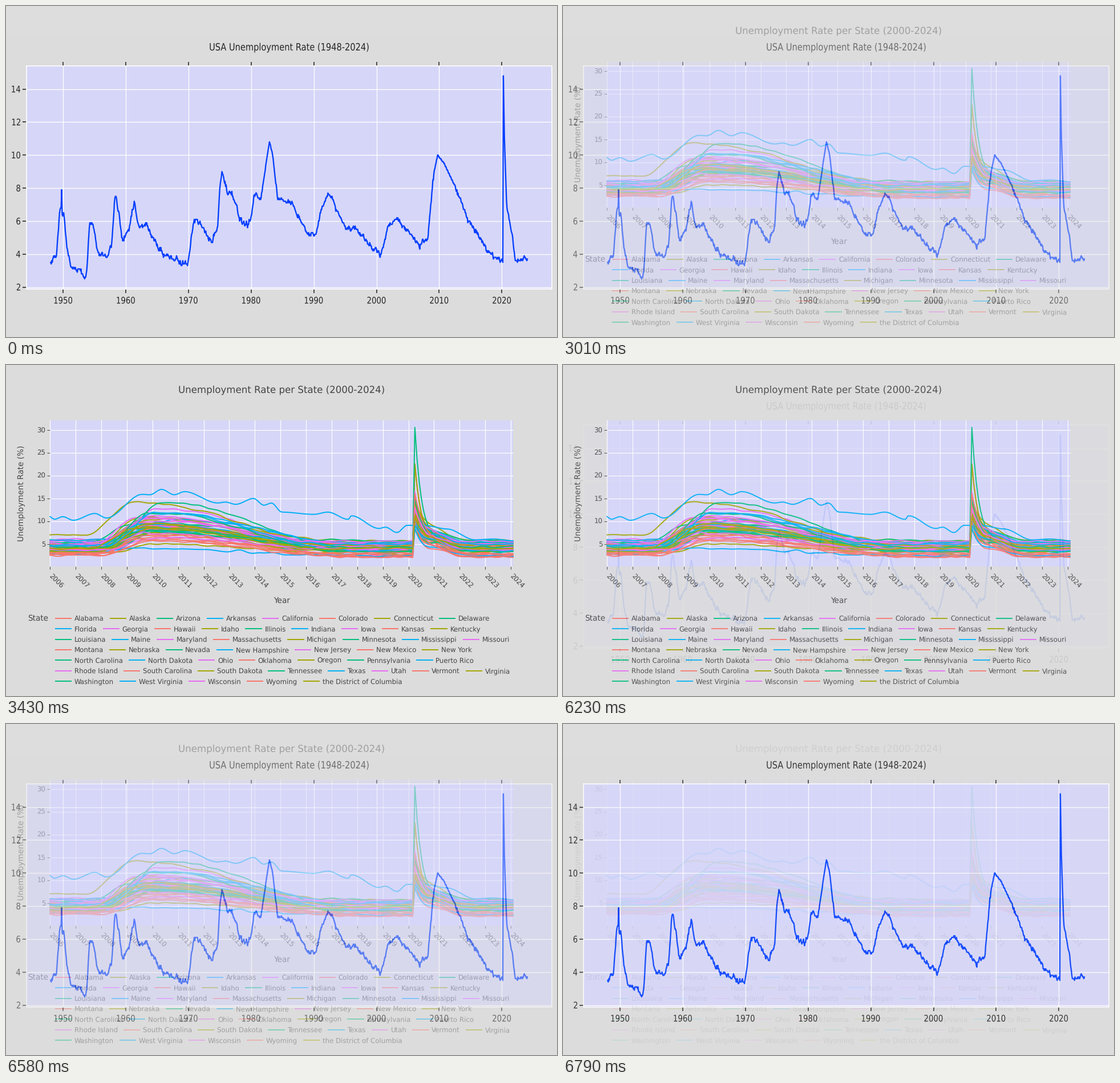
A matplotlib script for the animation above (6860 ms loop, 966 by 580 pixels).

```python
import numpy as np
import matplotlib.pyplot as plt
from matplotlib.animation import FuncAnimation
from matplotlib.patches import PathPatch, Rectangle
from matplotlib.textpath import TextPath
from matplotlib.transforms import Affine2D

W, H, DPI = 966, 580, 100
PT = 72 / DPI
GREY, PANEL, DARK, INK = "#dcdcdc", "#d6d6f8", "#262626", "#444444"
PALETTE = ["#F8766D", "#A3A500", "#00BF7D", "#00B0F6", "#E76BF3"]
TALL = 1.2          # the national chart has taller letters

plt.rcParams.update({"font.family": "DejaVu Sans", "text.hinting": "none"})
fig = plt.figure(figsize=(W / DPI, H / DPI), dpi=DPI, facecolor=GREY)

# Turning points of the national rate: (year, percent)
CYCLE = [
    (1948, 3.5), (1948.9, 3.9), (1949.5, 6.7), (1949.67, 6.7), (1949.75, 7.9),
    (1949.83, 6.5), (1950.1, 6.4), (1950.6, 4.4), (1951.3, 3.1), (1952.6, 3.1),
    (1953.4, 2.5), (1953.75, 3.0), (1954.2, 5.8), (1954.67, 6.0), (1955.5, 4.1),
    (1957.2, 3.9), (1957.7, 4.5), (1958.25, 7.4), (1958.5, 7.5), (1959.4, 5.0),
    (1960.3, 5.2), (1961.35, 7.1), (1962.1, 5.5), (1963.2, 5.8), (1966, 3.9),
    (1968.7, 3.5), (1969.9, 3.5), (1970.9, 6.0), (1971.8, 5.9), (1973.8, 4.7),
    (1974.7, 5.8), (1975, 8.1), (1975.35, 9.0), (1976.3, 7.6), (1976.9, 7.7),
    (1978.3, 6.0), (1979.4, 5.7), (1980.1, 6.3), (1980.5, 7.7), (1981.5, 7.3),
    (1982.92, 10.8), (1983.4, 10.1), (1984.2, 7.4), (1986.5, 7.1), (1989.2, 5.1),
    (1990.4, 5.3), (1991.2, 6.7), (1992.4, 7.7), (1995, 5.6), (1996.3, 5.6),
    (2000.6, 3.9), (2001.9, 5.7), (2003.42, 6.1), (2006.9, 4.5), (2008.2, 5.0),
    (2009.2, 9.0), (2009.75, 10.0), (2010.8, 9.5), (2012.9, 7.8), (2014.5, 6.1),
    (2018, 4.1), (2020.17, 3.5), (2020.25, 14.8), (2020.42, 11.0), (2020.8, 6.8),
    (2021.4, 5.8), (2022.2, 3.6), (2024.1, 3.8),
]

# Crests and troughs of the one curve above the bundle
ISLAND = [
    (2006, 11), (2006.15, 10.4), (2006.5, 11), (2006.9, 10.2), (2007.75, 11.7),
    (2008.2, 10.7), (2009.6, 15.9), (2009.9, 15.8), (2010.35, 17), (2010.85, 15.8),
    (2011.25, 16.5), (2012.55, 14), (2012.85, 14.2), (2013.25, 13.7), (2013.95, 15),
    (2014.35, 13.5), (2014.65, 14), (2015.05, 12), (2016.3, 11.5), (2016.85, 12),
    (2017.65, 10.4), (2017.77, 11.2), (2018.85, 8.4), (2019.1, 8.7), (2019.55, 7.5),
    (2019.95, 9.1), (2020.7, 9), (2021.5, 8.3), (2022.6, 5.9), (2023.3, 6.1), (2024.1, 5.7),
]

LEGEND = """\
Alabama, Alaska, Arizona, Arkansas, California, Colorado, Connecticut, Delaware
Florida, Georgia, Hawaii, Idaho, Illinois, Indiana, Iowa, Kansas, Kentucky
Louisiana, Maine, Maryland, Massachusetts, Michigan, Minnesota, Mississippi, Missouri
Montana, Nebraska, Nevada, New Hampshire, New Jersey, New Mexico, New York
North Carolina, North Dakota, Ohio, Oklahoma, Oregon, Pennsylvania, Puerto Rico
Rhode Island, South Carolina, South Dakota, Tennessee, Texas, Utah, Vermont, Virginia
Washington, West Virginia, Wisconsin, Wyoming, the District of Columbia"""

# Outliers: level before 2008, peak, level before 2020, 2020 spike, delay in years
OUTLIERS = {
    "Michigan": (7.0, 14.1, 4.6, 22.6, -0.6),
    "Nevada": (4.4, 14.0, 4.3, 30.6, 0.5),
    "California": (4.9, 12.6, 4.3, 16.2, 0.3),
    "Hawaii": (2.6, 7.0, 2.2, 22.4, 0.0),
    "North Dakota": (2.9, 4.0, 2.5, 8.5, -0.5),
    "Nebraska": (3.0, 4.9, 2.9, 8.2, 0.2),
}


def ease(x):
    x = np.clip(x, 0, 1)
    return x * x * (3 - 2 * x)


def eased_path(t, points):
    xs, ys = np.array(points).T
    i = np.clip(np.searchsorted(xs, t, "right") - 1, 0, len(xs) - 2)
    return ys[i] + (ys[i + 1] - ys[i]) * ease((t - xs[i]) / (xs[i + 1] - xs[i]))


def ripple(rng, n, size, width=9):
    win = np.hanning(width + 2)[1:-1]
    noise = rng.normal(0, size, n + width - 1)
    return np.convolve(noise, win / win.sum(), mode="valid")


def scene():
    ax = fig.add_axes([0, 0, 1, 1])
    ax.set(xlim=(0, W), ylim=(H, 0))
    ax.axis("off")
    return ax


def line(ax, xs, ys, color, px, **kw):
    ax.plot(xs, ys, color=color, lw=px * PT, **kw)


def tick(ax, xs, ys, color, px):
    line(ax, xs, ys, color, px, solid_capstyle="butt")


def box(ax, x0, y0, x1, y1, color):
    ax.add_patch(Rectangle((x0, y0), x1 - x0, y1 - y0, fc=color, lw=0))


def label(ax, x, y, s, px, ha="left", turn=0):
    if turn:
        return ax.text(x, y, s, size=px * PT, color=INK, ha="center", va="center",
                       rotation=turn)
    return ax.text(x, y + 0.365 * px, s, size=px * PT, color=INK, ha=ha, va="baseline")


def tall_label(ax, x, y, s, px, ha="center"):
    path = TextPath((0, 0), s, size=px)
    ext = path.get_extents()
    dx = x - ext.x1 if ha == "right" else x - (ext.x0 + ext.x1) / 2
    move = Affine2D().scale(1, -TALL).translate(dx, y + 0.365 * px * TALL)
    ax.add_patch(PathPatch(path.transformed(move), fc=DARK, lw=0))


def snapshot(ax):
    fig.canvas.draw()
    shot = np.array(fig.canvas.buffer_rgba())[..., :3].astype(float)
    ax.remove()
    return shot


def national():
    ax = scene()
    box(ax, 0, 0, W, 55, "#dddddd")
    left, top, right, bottom = 36, 104.5, 956.5, 496
    box(ax, left, top, right, bottom, PANEL)

    def px(year):
        return 100.3 + (year - 1950) * 10.984

    def py(rate):
        return 145.5 + (14 - rate) * 28.92

    for year in range(1950, 2021, 10):
        x = px(year)
        line(ax, [x, x], [top, bottom], "white", 1.3)
        tick(ax, [x, x], [top - 7, top], DARK, 1.6)
        tick(ax, [x, x], [bottom, bottom + 7], DARK, 1.6)
        tall_label(ax, x, 515.5, str(year), 13.3)
    for rate in range(2, 15, 2):
        y = py(rate)
        line(ax, [left, right], [y, y], "white", 1.3)
        tick(ax, [left - 7, left], [y, y], DARK, 1.6)
        tall_label(ax, 25, y, str(rate), 13.3, "right")

    months = 1948 + np.arange(914) / 12
    rate = np.interp(months, *np.array(CYCLE).T)
    rng = np.random.default_rng(4)
    wobble = rng.uniform(-0.1, 0.1, months.size) + ripple(rng, months.size, 0.15, 5)
    rate = np.round(rate + wobble * (rate < 8.5) * (rate > 2.7), 1)
    line(ax, px(months), py(rate), "#023EFF", 2.3, solid_joinstyle="round")

    line(ax, [left, right, right, left, left], [top, top, bottom, bottom, top], "white", 1.6)
    tall_label(ax, 496.5, 71.5, "USA Unemployment Rate (1948-2024)", 14.6)
    return snapshot(ax)


def state_rate(name, hue, t, rng):
    if name == "Puerto Rico":
        return eased_path(t, ISLAND)
    base = np.clip(rng.normal(4.5 - 0.5 * (hue == 0), 0.9), 2.6, 6.8)
    peak = np.clip(base + rng.normal(4.6 - 0.7 * (hue == 0), 1.2), 5.2, 11.8)
    late = np.clip(0.85 * base + rng.normal(0.2, 0.6), 2.2, 6.2)
    shock, delay = rng.uniform(9, 17), rng.normal(0, 0.2)
    if name in OUTLIERS:
        base, peak, late, shock, delay = OUTLIERS[name]

    # Recession hump on a slowly drifting floor
    s = t - delay
    hump = ease((s - 2008) / 1.8) * (1 - ease((s - 2010.2) / 7))
    floor = base + (late - base) * ease((t - 2011) / 7)
    rate = floor + (peak - floor) * hump + ripple(rng, t.size, 0.3)

    # Jump in April 2020, then decay
    after = t > 2020.24
    dt = t[after] - 2020.25
    tail = late + 1.3 * np.exp(-((dt - 0.9) / 0.6) ** 2) + ripple(rng, dt.size, 0.3)
    rate[after] = tail + (shock - tail[0]) * np.exp(-dt / rng.uniform(0.25, 0.5))
    return np.maximum(rate, 1.9)


def by_state():
    ax = scene()
    left, top, right, bottom = 77, 97, 888.5, 353
    box(ax, left, top, right, bottom, PANEL)

    def px(year):
        return 77.4 + (year - 2006) * 44.87

    def py(rate):
        return 313.6 + (5 - rate) * 7.98

    for year in range(2006, 2025):
        x = px(year)
        line(ax, [x, x], [top, bottom], "white", 1.2)
        tick(ax, [x, x], [bottom, bottom + 5], INK, 1)
        label(ax, x + 10, 379, str(year), 11.7, turn=-45)
    for rate in range(5, 31, 5):
        y = py(rate)
        line(ax, [left, right], [y, y], "white", 1.2)
        tick(ax, [left - 5, left], [y, y], INK, 1)
        label(ax, 69.5, y, str(rate), 11.7, "right")

    rng = np.random.default_rng(23)
    t = 2006 + np.arange(218) / 12
    index = 0
    label(ax, 38, 443, "State", 13.66)
    for row, names in enumerate(LEGEND.splitlines()):
        x, y = 86, 444 + 18.35 * row
        for name in names.split(", "):
            hue = index % 5
            index += 1
            line(ax, px(t), py(state_rate(name, hue, t, rng)), PALETTE[hue], 1.95)
            tick(ax, [x, x + 29.3], [y, y], PALETTE[hue], 1.95)
            text = label(ax, x + 34, y, name, 11.7)
            x += 34 + text.get_window_extent().width + 9.8

    label(ax, 483, 43, "Unemployment Rate per State (2000-2024)", 16.6, "center")
    label(ax, 483, 412, "Year", 13.66, "center")
    label(ax, 27, 225, "Unemployment Rate (%)", 13.66, turn=90)
    return snapshot(ax)


usa, states = national(), by_state()
picture = fig.figimage(usa.astype(np.uint8))


def update(n):
    mix = np.interp(n, [39, 49, 88, 98], [0, 1, 1, 0])
    picture.set_data(np.rint(usa + (states - usa) * mix).astype(np.uint8))
    return [picture]


anim = FuncAnimation(fig, update, frames=98, interval=70, repeat=True)
plt.show()
```
